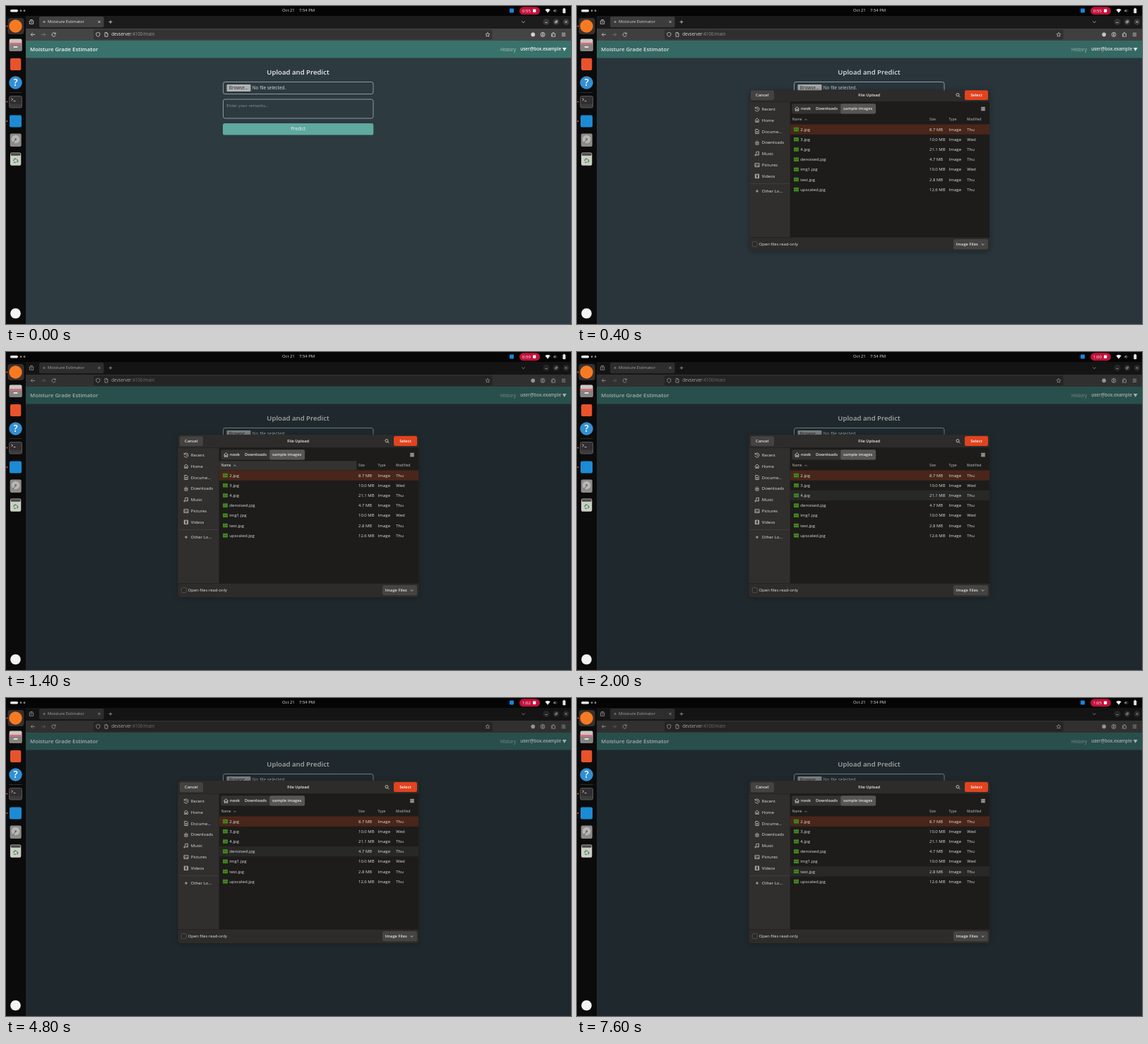
Write an HTML page with a canvas that moves like this. It is 800 by 450 pixels and loops after 8 s.

```html
<!DOCTYPE html>
<html lang="en">
<head>
<meta charset="utf-8">
<title>File dialog</title>
<style>
html, body { margin: 0; width: 100%; height: 100%; overflow: hidden; background: #000; }
canvas { display: block; }
</style>
</head>
<body>
<canvas id="stage" width="800" height="450"></canvas>
<script>
const g = document.getElementById('stage').getContext('2d');
const LOOP = 8000;

// Schedules: [start in ms, value]
const CLOCK = [[0, '0:55'], [1000, '0:59'], [2000, '1:00'], [3000, '1:01'],
  [4000, '1:02'], [5000, '1:03'], [6000, '1:04'], [7000, '1:05']];
const DIM = [[0, 0], [400, 0.08], [600, 0.27], [800, 0.3]];
// Hovered list line: -1 is the column header, null is none
const HOVER = [[0, null], [1400, -1], [1600, 1], [2000, 2], [4400, 4],
  [4600, 5], [4800, 3], [5000, 2], [6600, 3], [7600, 5]];
const at = (list, t) => list.filter(e => e[0] <= t).pop()[1];

const FILES = [
  ['2.jpg', '8.7 MB', 'Thu'], ['3.jpg', '10.0 MB', 'Wed'], ['4.jpg', '21.1 MB', 'Thu'],
  ['denoised.jpg', '4.7 MB', 'Thu'], ['img1.jpg', '10.0 MB', 'Wed'],
  ['test.jpg', '2.8 MB', 'Thu'], ['upscaled.jpg', '12.6 MB', 'Thu']];

// Sidebar entries: label, y, icon path around 0,0
const PLACES = [
  ['Recent', 146, 'M-2.6 -1.5A3 3 0 1 1 -2.9 .8M-2.8 -3V-1.3H-1M0 -1.6V.2H1.5'],
  ['Home', 161.7, 'M-3 0L0 -2.8L3 0M-2.2 -.5V2.8H-.7V.8H.7V2.8H2.2V-.5'],
  ['Docume…', 177.5, 'M-2.2 -3H1L2.3 -1.7V3H-2.2ZM-1 0H1M-1 1.4H1'],
  ['Downloads', 193.3, 'M0 -3V1M-1.6 -.5L0 1.1L1.6 -.5M-2 -1.5V2.8H2V-1.5'],
  ['Music', 209.1, 'M-1.2 2V-2.6L2.4 -3V1.4M-1.2 2A1 .8 0 1 1 -1.3 1.6M2.4 1.4A1 .8 0 1 1 2.3 1'],
  ['Pictures', 225, 'M-3 -2.3H3V2.5H-3ZM-3 1.5L-1 -.4L.6 1.2L1.6 .3L3 1.6'],
  ['Videos', 240.8, 'M-2.7 -2.7H2.7V2.7H-2.7ZM-1.4 -2.7V2.7M1.4 -2.7V2.7M-2.7 0H-1.4M1.4 0H2.7'],
  ['Other Lo…', 262, 'M-2 0H2M0 -2V2']];

function rect(x, y, w, h, fill, r = 0, line) {
  g.beginPath();
  g.roundRect(x, y, w, h, r);
  if (fill) { g.fillStyle = fill; g.fill(); }
  if (line) { g.strokeStyle = line; g.lineWidth = 0.8; g.stroke(); }
}

function disc(x, y, r, fill) {
  g.beginPath();
  g.arc(x, y, r, 0, 7);
  g.fillStyle = fill;
  g.fill();
}

// y is the optical middle of the line
function text(s, x, y, size, color, weight = 400, align = 'left') {
  g.font = `${weight} ${size}px "Open Sans", "Noto Sans", sans-serif`;
  g.textAlign = align;
  g.fillStyle = color;
  g.fillText(s, x, y + size * 0.35);
  return x + g.measureText(s).width;
}

function icon(d, x, y, color = '#dcdcdc', width = 0.8, fill = false) {
  g.save();
  g.translate(x, y);
  g.lineWidth = width;
  g.strokeStyle = g.fillStyle = color;
  g[fill ? 'fill' : 'stroke'](new Path2D(d));
  g.restore();
}

function topBar(clock) {
  rect(0, 0, 800, 14, '#050505');
  rect(6, 5, 11, 3.4, '#f4f4f4', 1.7);
  disc(21, 6.7, 1.4, '#858585');
  disc(26, 6.7, 1.4, '#858585');
  text('Oct 21', 391, 6.3, 5.9, '#e8e8e8', 500);
  text('7:54 PM', 415, 6.3, 5.9, '#e8e8e8', 500);
  rect(713, 3.5, 6, 6, '#1784dc', 1);
  rect(727, 1.3, 29, 11, '#c3113c', 5.5);
  text(clock, 731, 6.7, 6, '#fff', 500);
  rect(746, 4.6, 4.3, 4.3, '#fff', 0.8);
  icon('M-3.6 -1.4Q0 -4 3.6 -1.4L0 3Z', 767, 6.7, '#f0f0f0', 1, true);
  icon('M-3 -1H-1.6L.2 -2.6V2.6L-1.6 1H-3Z', 778, 6.7, '#777', 1, true);
  icon('M1.4 -1.4Q2.5 0 1.4 1.4', 778, 6.7, '#555');
  rect(788.3, 3.8, 4, 6.5, '#e4e4e4', 0.8);
  rect(789.4, 2.8, 1.8, 1.2, '#e4e4e4');
}

function dock() {
  rect(0, 14, 28, 436, '#0b0b0b');
  rect(2.5, 17, 23, 23, '#38302d', 4);
  disc(13.5, 28.5, 9.2, '#f77a22');
  for (const y of [28.5, 135.5, 163]) disc(1.4, y, 1.1, '#e2532a');

  rect(4.7, 46.5, 17.8, 17.5, '#c9c7c5', 2);
  rect(4.7, 52, 17.8, 3, '#dc6d78');
  rect(4.7, 54.5, 17.8, 9.5, '#858382', 2);
  rect(10.5, 57, 6, 2, '#e4e2e0', 1);

  rect(6, 74, 15.3, 17, '#e8532b', 2);
  disc(13.5, 108.5, 9.3, '#338fd2');
  text('?', 13.5, 108.5, 13.5, '#fff', 600, 'center');
  rect(4.5, 122, 18, 0.8, '#343434');

  rect(4.7, 127.5, 17.8, 16.5, '#3b3b3b', 2, '#646464');
  rect(5.3, 128.2, 16.6, 10.5, '#302e30', 1);
  icon('M-3 -2L-.8 -.3L-3 1.4M.2 2H3', 10.5, 132.5, '#ddd');

  rect(5, 154.5, 17, 17, '#1c8bd3', 2);

  rect(5.7, 180.5, 16, 18.5, '#8d8c8a', 2);
  disc(13.6, 188.5, 5.8, '#b9b7b4');
  disc(13.6, 188.5, 1.5, '#706e6b');
  icon('M0 0L-4 4.5', 13.6, 189.5, '#5f5d5a', 1);

  rect(6, 207.5, 15.3, 18.3, '#cfcdc7', 2);
  rect(6.8, 208.3, 13.7, 3.4, '#4a4a48', 1);
  icon('M-3 1L-1.2 -2H1.2M2 -1.2L3.2 1.2L1.8 3M.2 3H-2.4', 13.6, 218.2, '#3d9655', 1.5);
  disc(13.5, 435, 7.3, '#f3f3f3');
}

function browser() {
  rect(28, 14, 772, 18, '#1d1c1d');
  icon('M-2.7 -1.5H2.7V2.8H-2.7ZM-1.8 -3H1.8M-1 .1L0 1L1 .1', 36, 22.5);
  rect(47, 15, 91.5, 15.2, '#424142', 2);
  disc(54, 22.4, 1.6, '#8f8f8f');
  text('Moisture Estimator', 59, 22.3, 5.85, '#e8e8e8');
  const cross = 'M-1.6 -1.6L1.6 1.6M1.6 -1.6L-1.6 1.6';
  icon(cross, 132, 22.4);
  icon('M-2.4 0H2.4M0 -2.4V2.4', 148, 22.5);
  icon('M-2.2 -1L0 1.2L2.2 -1', 732.5, 22.5);
  for (const x of [765, 779, 793]) disc(x, 22.5, 4.5, '#383738');
  icon('M-1.6 1H1.6', 765, 22.5);
  icon('M-1.5 -.7H.7V1.5H-1.5ZM-.5 -1.6H1.6V.5', 779, 22.5);
  icon(cross, 793, 22.5);

  rect(28, 32, 772, 17, '#454445');
  const arrow = 'M3 0H-2.7M-.3 -2.4L-2.7 0L-.3 2.4';
  icon(arrow, 38, 40.4);
  g.save();
  g.scale(-1, 1);
  icon(arrow, -53, 40.4, '#848384');
  g.restore();
  icon('M2.3 -1.3A2.6 2.6 0 1 0 2.6 .8M2.7 -2.9V-1H.8', 67.5, 40.4);
  rect(124, 33.4, 564.5, 14, '#343334', 2);
  icon('M0 -3L2.6 -2V0Q2.4 2.2 0 3.1Q-2.4 2.2 -2.6 0V-2Z', 130.3, 40.4);
  icon('M-2 -2.8H.8L2 -1.6V2.8H-2ZM.6 -2.8V-1.3H2', 142, 40.4);
  const end = text('devserver', 149.3, 40.3, 6.2, '#ececec');
  text(':4100/main', end, 40.3, 6.2, '#9c9c9c');
  icon('M0 -3L.9 -1L3 -.8L1.4 .6L1.9 2.8L0 1.7L-1.9 2.8L-1.4 .6L-3 -.8L-.9 -1Z', 682, 40.4, '#dcdcdc', 0.7);
  disc(746.2, 40.4, 2.8, '#d4d4d4');
  icon('M3 0A3 3 0 1 1 -3 0A3 3 0 1 1 3 0M1 -.8A1 1 0 1 1 -1 -.8A1 1 0 1 1 1 -.8M-1.8 2Q0 .2 1.8 2', 760, 40.4);
  icon('M-2.6 -1.2H-.8V-2.7H.8V-1.2H2.5V2.7H-2.6V1.3H-1.3V.1H-2.6Z', 775, 40.4);
  icon('M-2.7 -2H2.7M-2.7 0H2.7M-2.7 2H2.7', 789.5, 40.4);
}

function page(focused) {
  rect(28, 49, 772, 401, '#2d3a40');
  rect(28, 49, 772, 24.6, '#39716b');
  text('Moisture Grade Estimator', 34, 61.2, 7.75, '#f3f5f5', 600);
  text('History', 700, 61.2, 6.6, '#b5c8c5');
  text('user@box.example', 728.3, 61.2, 6.3, '#f3f5f5', 600);
  icon('M-2.9 -2.4H2.9L0 2.7Z', 790.7, 61.4, '#f3f5f5', 1, true);

  text('Upload and Predict', 413.5, 93.7, 9.6, '#eef1f1', 600, 'center');
  rect(307.5, 107.5, 212.5, 17, null, 2.7, focused ? '#aecbd2' : '#a9b2b5');
  rect(312.5, 111, 34, 10, '#afb1b3', 1.2);
  text('Browse...', 329.4, 115.9, 6.4, '#24272a', 400, 'center');
  text('No file selected.', 348.8, 115.9, 6.4, '#dde1e2');
  rect(307.5, 132, 212.5, 27, null, 2.7, '#a9b2b5');
  text('Enter your remarks...', 312.3, 140.6, 6.1, '#8b9599');
  rect(307, 166, 213.3, 16.6, '#5fa99f', 2.7);
  text('Predict', 413.6, 174.2, 6.4, '#edf5f4', 400, 'center');
}

function fileRow([name, size, day], i, hover) {
  const h = 14.17, y = 174.6 + i * h, ink = '#dededc';
  if (i === 0) rect(302, y - h / 2, 282.5, h, '#4a261a');
  else if (i === hover) rect(302, y - h / 2, 282.5, h, '#282827');
  rect(307, y - 2.8, 7, 5.6, '#42861f', 0.4);
  rect(307.8, y - 0.3, 5.4, 0.8, '#285b17');
  text(name, 316.3, y, 6.1, ink);
  text(size, 499, y, 5.95, ink);
  text('Image', 526.6, y, 6.1, ink);
  text(day, 552.3, y, 6, ink);
}

function dialog(opening, hover) {
  const ink = '#e4e3e1';
  const box = opening ? [245, 119.3, 339, 227.2] : [243.5, 117, 341, 230];
  g.save();
  g.shadowColor = 'rgba(0,0,0,.3)';
  g.shadowBlur = 6;
  g.shadowOffsetY = 1;
  rect(...box, '#2d2c2a', 4);
  g.restore();

  g.save();
  g.beginPath();
  g.roundRect(...box, 4);
  g.clip();
  rect(243, 135.3, 58.7, 192, '#302f2d');
  rect(301.7, 135.3, 284, 192, '#1d1c1a');
  rect(243, 135, 342, 0.6, '#1b1a19');
  rect(243, 327, 342, 0.6, '#1b1a19');

  rect(246, 119.3, 33, 14, '#444341', 2.5);
  text('Cancel', 262.3, 126.2, 5.8, ink, 600, 'center');
  text('File Upload', 413.7, 126.2, 5.75, '#efeeec', 600, 'center');
  icon('M1.3 -.6A2 2 0 1 1 -2.7 -.6A2 2 0 1 1 1.3 -.6M.8 .9L2.8 2.9', 539.7, 126.2);
  rect(549, 119, 33, 14, '#e1431f', 2.5);
  text('Select', 565.5, 126.2, 5.8, '#fff', 600, 'center');

  for (const [label, y, d] of PLACES) {
    icon(d, 255, y, '#cfcecb', 0.75);
    text(label, 261.8, y, 6, ink);
  }
  rect(245, 251.3, 56, 0.7, '#434240');

  rect(304.3, 138.3, 118.8, 14.2, '#343331', 2.5);
  rect(373.3, 138.3, 49.8, 14.2, '#575654', 2.5);
  icon(PLACES[1][2], 311.5, 145.5);
  text('nook', 317, 145.4, 5.8, ink, 600);
  text('Downloads', 338, 145.4, 5.8, ink, 600);
  text('sample images', 377, 145.4, 5.75, ink, 600);
  icon('M-2.3 -2.3H-.4V-.4H-2.3ZM.5 -2.3H2.4V-.4H.5ZM-2.3 .5H-.4V2.4H-2.3ZM.5 .5H2.4V2.4H.5Z', 575, 145.5, '#dcdcdc', 0.7);

  if (hover === -1) rect(302, 154.3, 194.5, 13, '#343331');
  const head = hover === -1 ? '#cfcecb' : '#9d9c99';
  text('Name', 304.7, 160.6, 4.8, head, 600);
  icon('M-1.8 .8L0 -1L1.8 .8', 324, 160.8, head, 0.7);
  text('Size', 499, 160.6, 4.8, '#9d9c99', 600);
  text('Type', 526.5, 160.6, 4.8, '#9d9c99', 600);
  text('Modified', 552, 160.6, 4.8, '#9d9c99', 600);
  FILES.forEach((file, i) => fileRow(file, i, hover));

  rect(248.3, 333.6, 6.8, 6.8, '#292826', 1.2, '#5b5a57');
  text('Open files read-only', 257.7, 337.1, 5.9, ink);
  rect(533, 330, 49, 14.2, '#454442', 2.5);
  text('Image Files', 536.8, 337.1, 5.75, ink, 600);
  icon('M-1.8 -.9L0 .9L1.8 -.9', 574.5, 337.3);
  g.restore();
}

function draw(now) {
  const t = now % LOOP;
  topBar(at(CLOCK, t));
  dock();
  browser();
  page(t >= 200);
  if (t >= 400) {
    rect(28, 14, 772, 436, `rgba(0,0,0,${at(DIM, t)})`);
    dialog(t < 600, at(HOVER, t));
  }
  requestAnimationFrame(() => draw(performance.now() - start));
}

const start = performance.now();
draw(0);
</script>
</body>
</html>
```
